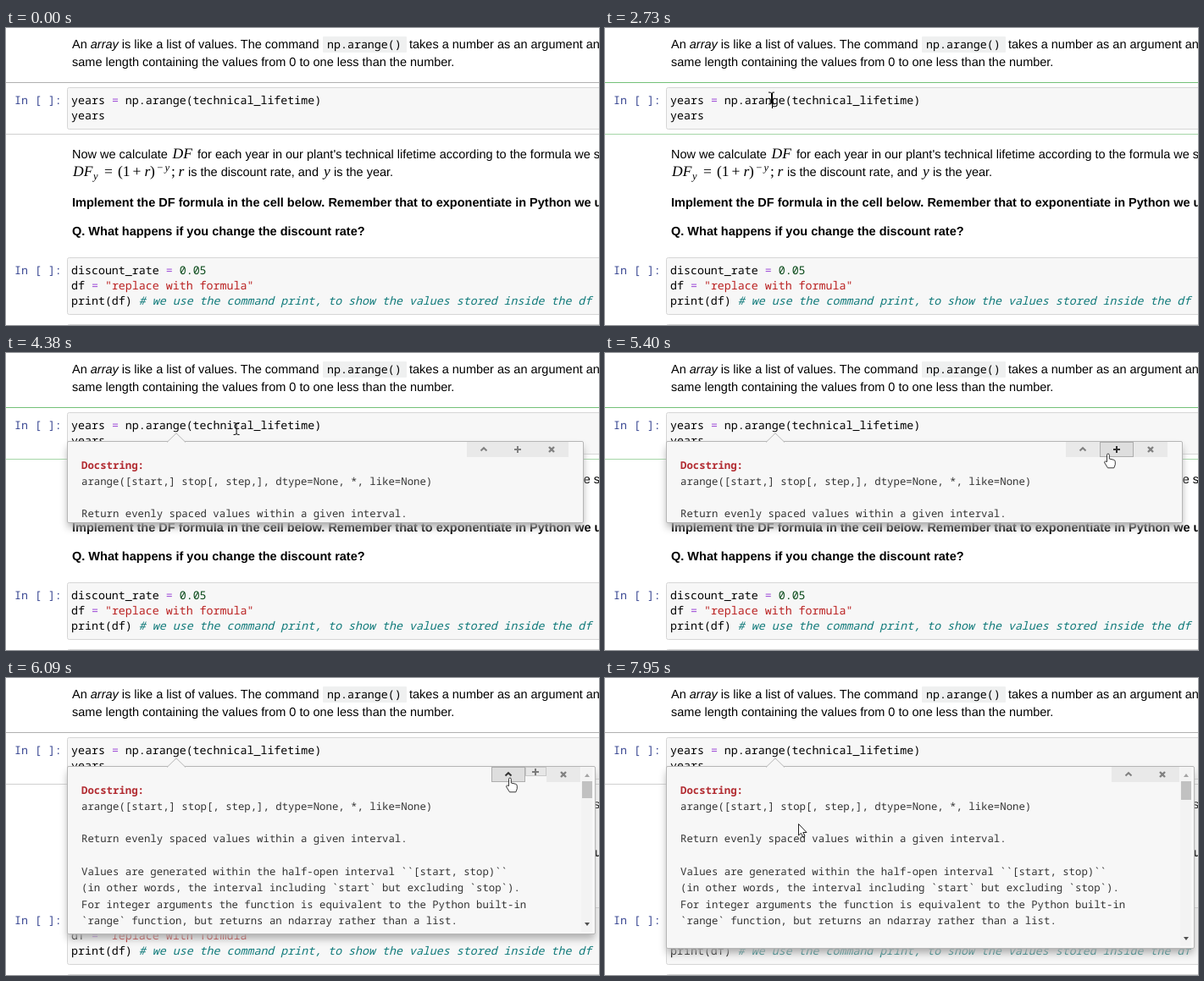
Write an HTML page that moves like this. It is 700 by 351 pixels and loops after 8 s.

```html
<!DOCTYPE html>
<html lang="en">
<head>
<meta charset="utf-8">
<title>Notebook docstring</title>
<style>
html, body { margin: 0; width: 100%; height: 100%; overflow: hidden; background: #fff; }
#stage { position: absolute; left: 0; top: 0; width: 700px; height: 351px; overflow: hidden; }
#stage > svg { position: absolute; left: 0; top: 0; }
text, pre { white-space: pre; text-rendering: geometricPrecision; }
.prose { font: 14.5px "Liberation Sans", Arial, sans-serif; }
.strong { font-weight: bold; }
.math { font: italic 17.5px "Liberation Serif", serif; }
.up { font-style: normal; }
.small { font-size: 12.5px; }
.code { font: 13.31px "Noto Sans Mono", monospace; }
.prompt { fill: #3c4a94; }
.op { fill: #a050d8; }
.cell { fill: #f7f7f7; stroke: #d6d6d6; }

#tip { position: absolute; left: 72px; top: 104px; box-sizing: border-box; background: #f7f7f7;
  border: 1px solid #b6b6b6; border-radius: 2px; box-shadow: 0 6px 10px -1px #adadad; }
#pointer { position: absolute; left: 116px; top: -11px; }
#clip { position: absolute; inset: 0 0 3px; overflow: hidden; }
#clip pre { position: absolute; left: 16px; top: 17.6px; margin: 0; color: #333;
  font: 12.33px/19.3px "Noto Sans Mono", monospace; }
#clip b { color: #b22b31; }
.button { position: absolute; top: 0; height: 18px; box-sizing: border-box; overflow: hidden;
  background: #e9e9e9; border: 1px solid #e9e9e9; color: #808080; }
.button.hover { background: #dedede; border-color: #adadad; color: #333; }
.button svg { position: absolute; left: 50%; top: 50%; margin: -5px; }
#scroll { position: absolute; right: 3px; top: 1px; bottom: 2px; width: 13px; background: #f3f3f3; }
#scroll i { position: absolute; left: 3.5px; border: 3px solid transparent; }
#scroll .upward { top: 7px; border-bottom: 4px solid #a3a3a3; border-top: 0; }
#scroll .downward { bottom: 7px; border-top: 4px solid #505050; border-bottom: 0; }
#thumb { position: absolute; left: 1px; top: 16px; width: 12px; background: #c1c1c1; }
#hint { position: absolute; left: 602px; top: 130px; width: 150px; height: 21px; box-sizing: border-box;
  padding-left: 6px; white-space: nowrap; background: #fff; border: 1px solid #a0a0a0; color: #4a4a4a;
  font: 9.2px/19px "Open Sans", sans-serif; }
#keys { position: absolute; left: 279px; top: 314px; width: 143px; height: 37px; background: #000;
  color: #fff; text-align: center; font: bold 24px/38px "Open Sans", sans-serif; }
</style>
</head>
<body>
<div id="stage">
  <svg width="700" height="351">
    <rect x="374" y="10" width="99" height="19" rx="1" fill="#eff0f0"/>
    <g class="prose">
      <text x="78" y="24">An <tspan font-style="italic">array</tspan> is like a list of values. The command</text>
      <text x="476" y="24">takes a number as an argument an</text>
      <text x="78" y="45">same length containing the values from 0 to one less than the number.</text>
      <text x="78" y="153.5">Now we calculate</text>
      <text x="226" y="153.5">for each year in our plant's technical lifetime according to the formula we s</text>
      <text x="215" y="174.5">is the discount rate, and</text>
      <text x="387" y="174.5">is the year.</text>
      <g class="strong">
        <text x="78" y="210.5">Implement the DF formula in the cell below. Remember that to exponentiate in Python we u</text>
        <text x="78" y="245">Q. What happens if you change the discount rate?</text>
      </g>
    </g>
    <g class="math">
      <text x="196.5" y="153.5">DF</text>
      <text x="79" y="174.5">DF</text>
      <text x="103" y="179" class="small">y</text>
      <text x="116" y="174.5" class="up">=</text>
      <text x="132" y="174.5" class="up">(1</text>
      <text x="149.5" y="174.5" class="up">+</text>
      <text x="163.5" y="174.5">r</text>
      <text x="170" y="174.5" class="up">)</text>
      <text x="177.5" y="169" class="small">−</text>
      <text x="187.5" y="169" class="small">y</text>
      <text x="195" y="174.5" class="up">;</text>
      <text x="203.5" y="174.5">r</text>
      <text x="375" y="174.5">y</text>
    </g>

    <rect id="edgeTop" y="64" width="700" height="1"/>
    <rect id="edgeBottom" y="125" width="700" height="1"/>
    <rect class="cell" x="72.5" y="70.5" width="640" height="49" rx="2"/>
    <rect class="cell" x="72.5" y="271.5" width="640" height="67" rx="2"/>
    <rect class="cell" x="72.5" y="350.5" width="640" height="40" rx="2"/>
    <g class="code">
      <text x="379" y="24">np.arange()</text>
      <text x="10" y="90" class="prompt">In [ ]:</text>
      <text x="77" y="90">years <tspan class="op">=</tspan> np.arange(technical_lifetime)</text>
      <text x="77" y="108">years</text>
      <text x="10" y="291" class="prompt">In [ ]:</text>
      <text x="77" y="291">discount_rate <tspan class="op">=</tspan> <tspan fill="#0a4a1a">0.05</tspan></text>
      <text x="77" y="309">df <tspan class="op">=</tspan> <tspan fill="#ba2121">"replace with formula"</tspan></text>
      <text x="77" y="327">print(df) <tspan fill="#107a7a" font-style="italic"># we use the command print, to show the values stored inside the df</tspan></text>
    </g>
    <rect id="caret" x="197" y="77" width="1" height="18"/>
  </svg>

  <div id="tip">
    <svg id="pointer" width="24" height="12"><path d="M1 11.5L12 .8L23 11.5" fill="#f7f7f7" stroke="#b6b6b6"/></svg>
    <div id="clip"><pre><b>Docstring:</b>
arange([start,] stop[, step,], dtype=None, *, like=None)

Return evenly spaced values within a given interval.

Values are generated within the half-open interval ``[start, stop)``
(in other words, the interval including `start` but excluding `stop`).
For integer arguments the function is equivalent to the Python built-in
`range` function, but returns an ndarray rather than a list.
</pre></div>
    <div id="scroll"><i class="upward"></i><div id="thumb"></div><i class="downward"></i></div>
    <div class="button" id="pager"><svg width="10" height="10"><path d="M1.5 6.5L5 3.2L8.5 6.5" fill="none" stroke="currentColor" stroke-width="2"/></svg></div>
    <div class="button" id="expand"><svg width="10" height="10"><path d="M5 1V9M1 5H9" stroke="currentColor" stroke-width="2"/></svg></div>
    <div class="button" id="close"><svg width="10" height="10"><path d="M2 2L8 8M8 2L2 8" stroke="currentColor" stroke-width="2.4"/></svg></div>
  </div>

  <div id="hint">show the current docstring in pager</div>
  <div id="keys">Shift + Tab</div>

  <svg width="700" height="351">
    <g id="cursor" stroke-linejoin="round">
      <path id="beam" d="M-3.5 -7Q-.5 -7 0 -6Q.5 -7 3.5 -7M0 -6V6M-3.5 7Q-.5 7 0 6Q.5 7 3.5 7" fill="none" stroke="#000"/>
      <path id="arrow" d="M.5 .5V14L3.5 11.3L5.8 16L8 15L5.8 10.5H10Z" fill="#fff" stroke="#222"/>
      <path id="hand" d="M-1.5 9.5V1.5a1.4 1.4 0 0 1 2.8 0V6l5 1.2q2 .5 2 2.3v3.3l-1.5 4H-.5l-3.6-5.8q-.9-1.6 .5-2Z" fill="#fff" stroke="#222" stroke-width=".9"/>
    </g>
  </svg>
</div>

<script>
const LOOP = 8000, ENTER = 510, FOCUS = 1650, BLUR = 5780, SHOW = 3210, EXPAND = 5810;
const el = Object.fromEntries([...document.querySelectorAll("[id]")].map(e => [e.id, e]));

const clamp = v => Math.min(1, Math.max(0, v));
const ramp = (t, start, length) => clamp((t - start) / length);
const mix = (a, b, p) => a + (b - a) * p;
const swing = p => 0.5 - Math.cos(Math.PI * p) / 2;
const easeIn = p => p * p;
const easeOut = p => p * (2 - p);
const linear = p => p;

// cubic-bezier(.25, .1, .25, 1)
function ease(p) {
  let lo = 0, hi = 1, s = p;
  for (let i = 0; i < 20; i++) {
    s = (lo + hi) / 2;
    if (0.75 * s * (1 - s) + s ** 3 < p) lo = s; else hi = s;
  }
  return 0.3 * s * (1 - s) ** 2 + 3 * s * s * (1 - s) + s ** 3;
}

// time, x, y, easing towards this point
const path = [
  [ENTER, 446, -6],
  [1270, 200, 83, easeOut],
  [1350, 196.5, 83, linear],
  [4050, 196.5, 83, linear],
  [4710, 497, 109, easeIn],
  [5150, 591, 122, easeOut],
  [5400, 594, 119, swing],
  [5580, 594, 119, linear],
  [5630, 595, 118, linear],
  [6440, 595, 118, linear],
  [6550, 579, 121, easeIn],
  [7000, 320, 147, linear],
  [7390, 93, 138, easeOut],
  [7450, 92, 138, linear],
  [7940, 228, 172, swing]
];

function cursorAt(t) {
  const i = path.findIndex(point => point[0] > t);
  if (i < 0) return path.at(-1).slice(1);
  if (i === 0) return [-50, -50];
  const [t0, x0, y0] = path[i - 1], [t1, x1, y1, easing] = path[i];
  const p = easing(ramp(t, t0, t1 - t0));
  return [mix(x0, x1, p), mix(y0, y1, p)];
}

function overText(x, y) {
  const inside = (l, t, r, b) => x >= l && x < r && y >= t && y < b;
  return inside(78, 10, 700, 28) || inside(78, 32, 530, 50) || inside(72, 70, 700, 104) ||
    inside(89, 124, 163, 142) || inside(89, 142, 503, 160);
}

const show = (node, visible) => node.style.visibility = visible ? "inherit" : "hidden";

function draw(t) {
  const editing = t >= FOCUS && t < BLUR;
  el.edgeTop.setAttribute("fill", editing ? "#74c178" : "#b0b0b0");
  el.edgeBottom.setAttribute("fill", editing ? "#a5d6a7" : "#d0d0d0");
  show(el.caret, t >= 1695 && t < BLUR && (t - 1695) % 1032 < 516);

  const big = t >= EXPAND;
  const height = mix(97, 216, ease(ramp(t, EXPAND, 500)));
  el.tip.style.width = (big ? 624 : 610) + "px";
  el.tip.style.height = height + "px";
  el.tip.style.opacity = ease(ramp(t, SHOW, 400));
  show(el.tip, t >= SHOW);
  show(el.scroll, big);
  el.thumb.style.height = 14 + (height - 131) * 8 / 84 + "px";

  const [x, y] = cursorAt(t);
  const hidden = swing(ramp(t, EXPAND + 30, 600));
  const closeLeft = big ? 638 : 624;
  const expandWidth = 40 * (1 - hidden);
  let pressing = false;
  function place(button, left, width) {
    const hover = t >= SHOW && x >= left && x < left + width && y >= 105 && y < 123;
    pressing ||= hover;
    button.style.left = left - 73 + "px";
    button.style.width = width + "px";
    button.classList.toggle("hover", hover || (button === el.expand && big));
  }
  place(el.close, closeLeft, 40);
  place(el.expand, closeLeft - expandWidth, expandWidth);
  place(el.pager, closeLeft - expandWidth - 40, 40);
  el.expand.style.opacity = 1 - hidden;
  el.expand.style.height = 18 * (1 - hidden) + "px";
  show(el.expand, hidden < 1);

  el.hint.style.opacity = ramp(t, 6200, 100) * (1 - ramp(t, 6460, 80));
  el.keys.style.opacity = ramp(t, 3070, 120) * (1 - ramp(t, 3910, 150));

  const shape = pressing ? "hand" : overText(x, y) ? "beam" : "arrow";
  for (const name of ["hand", "beam", "arrow"]) show(el[name], name === shape);
  el.cursor.setAttribute("transform", `translate(${x} ${y})`);
}

const start = performance.now();
function tick() {
  draw((performance.now() - start) % LOOP);
  requestAnimationFrame(tick);
}
tick();
</script>
</body>
</html>
```
